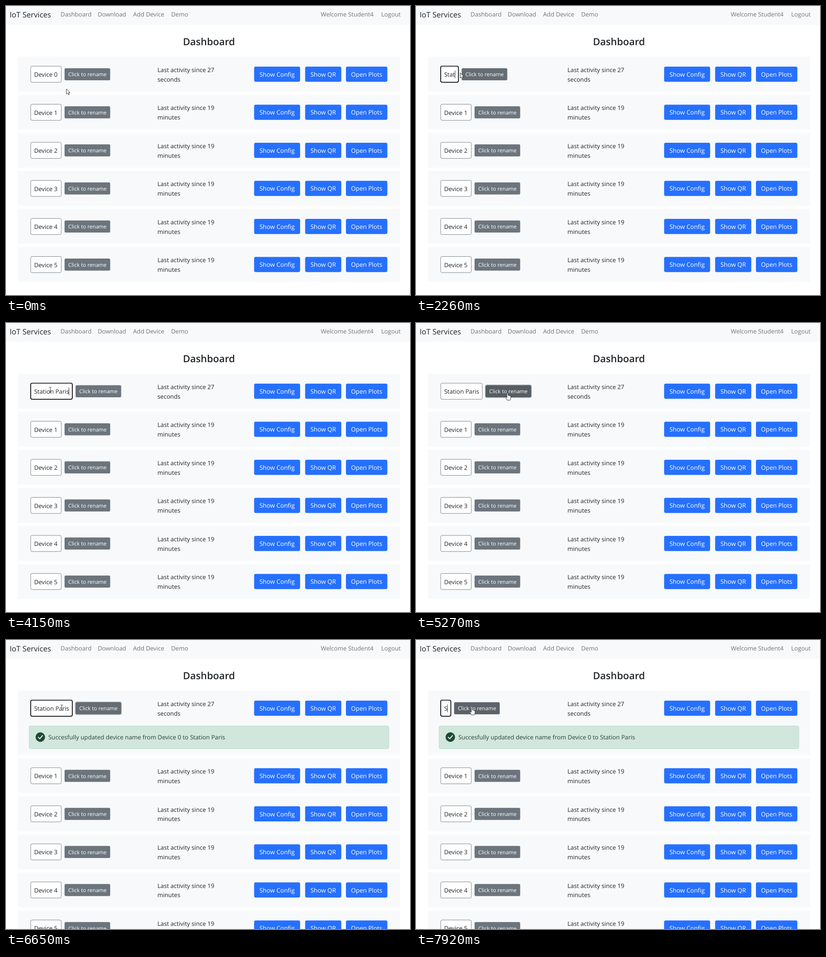
Animation of 883x634 px, one loop 8000 ms. Source, as an HTML page:

```html
<!DOCTYPE html>
<html lang="en">
<head>
<meta charset="utf-8">
<title>Dashboard</title>
<style>
  html, body { margin: 0; width: 100%; height: 100%; overflow: hidden; background: #fff; }
  svg { display: block; width: 883px; height: 634px; }
  text { font: 13.15px "Open Sans", "Noto Sans", sans-serif; fill: #212529; white-space: pre; text-rendering: geometricPrecision; }
  .brand { font-size: 16.5px; }
  .nav { fill: #717273; }
  .title { font-size: 21.5px; font-weight: 600; text-anchor: middle; }
  .button { font-size: 13.35px; fill: #fff; text-anchor: middle; }
  .small { font-size: 11.6px; fill: #fff; text-anchor: middle; }
  .notice { fill: #2c3e36; }
  .beam { mix-blend-mode: difference; fill: none; stroke: #ccc; }
</style>
</head>
<body>
<svg viewBox="0 0 883 634" xmlns="http://www.w3.org/2000/svg">
  <rect width="883" height="634" fill="#fff"/>
  <rect width="883" height="41.5" fill="#f8f9fa"/>
  <g id="header"></g>
  <g id="first"></g>
  <g id="others"></g>
  <g id="alert">
    <rect x="50.5" y="188.5" width="786.3" height="50" rx="3.5" fill="#d1e7dd" stroke="#badbcc"/>
    <circle cx="75" cy="213" r="10.4" fill="#1d4a36"/>
    <path d="M70.6 213.4l3.2 3.2l6-7" fill="none" stroke="#fff" stroke-width="1.9" stroke-linecap="round" stroke-linejoin="round"/>
    <text class="notice" x="92.4" y="218">Succesfully updated device name from Device 0 to Station Paris</text>
  </g>
  <g id="live"></g>
</svg>
<script>
const LOOP = 8000, ROW_TOP = 111.4, ROW_PITCH = 83.5, ALERT_SHIFT = 64.7;
const TEXT_X = 61.4, BOX_X = 54;
const GREY = '#6c757d', HOVER = '#5c636a', MIXED = '#656d74', PRESSED = '#565e64';

// Letter widths that size the rename field.
const ADVANCE = { S: 7.4, t: 4.7, a: 7.1, i: 3.4, o: 8.1, n: 7.9, ' ': 3.8, P: 7.8, r: 4.8, s: 5.9,
  D: 9.7, e: 7.3, v: 6.7, c: 6.4 };

// Each entry changes the state from its time on.
const STEPS = [
  [0, { value: 'Device 0', x: 132, y: 182, focus: false, caret: false, select: null, shade: null, ring: 0, alert: false }],
  [110, { x: 126, y: 176 }],
  [250, { x: 115, y: 166 }],
  [370, { x: 102, y: 152 }],
  [490, { x: 96.7, y: 146.7 }],
  [620, { focus: true, caret: true }],
  [740, { caret: false, select: [0, 6] }],
  [860, { select: [0, 8] }],
  [1630, { value: 'S', select: null, caret: true, shade: GREY }],
  [1750, { shade: MIXED }],
  [1880, { value: 'St', shade: null }],
  [2020, { value: 'Sta' }],
  [2260, { value: 'Stat', shade: MIXED }],
  [2390, { value: 'Stati', shade: null }],
  [2520, { value: 'Statio' }],
  [2770, { value: 'Station' }],
  [2890, { value: 'Station ' }],
  [3400, { value: 'Station P' }],
  [3520, { value: 'Station Pa' }],
  [3770, { value: 'Station Par' }],
  [3900, { value: 'Station Pari' }],
  [4150, { value: 'Station Paris' }],
  [4640, { x: 106, y: 148 }],
  [4770, { x: 137, y: 153 }],
  [4890, { x: 172, y: 156, shade: MIXED }],
  [5020, { x: 194, y: 156, shade: null }],
  [5150, { x: 200, y: 153.5 }],
  [5270, { focus: false, caret: false, shade: PRESSED, ring: 1.4 }],
  [5410, { ring: 2.8, alert: true }],
  [5520, { shade: HOVER }],
  [6030, { x: 194, y: 154 }],
  [6150, { x: 166, y: 153.5 }],
  [6280, { x: 132, y: 151.5 }],
  [6400, { x: 122, y: 150.5 }],
  [6650, { y: 148.5, focus: true, shade: MIXED, ring: 1.4 }],
  [6780, { caret: true, shade: null, ring: 0 }],
  [6900, { caret: false, select: [8, 13] }],
  [7020, { select: [0, 13] }],
  [7670, { value: 'S', select: null, caret: true, shade: GREY }],
  [7790, { shade: MIXED }],
  [7920, { shade: null }]
];

const byId = id => document.getElementById(id);
const widthOf = s => [...s].reduce((sum, c) => sum + (ADVANCE[c] || 7.5), 0);
const text = (x, y, s, cls = '') => `<text class="${cls}" x="${x}" y="${y}">${s}</text>`;
const rect = (x, y, w, h, fill, rx = 0, more = '') =>
  `<rect x="${x}" y="${y}" width="${w}" height="${h}" rx="${rx}" fill="${fill}" ${more}/>`;

function blueButton(x, w, label) {
  return rect(x, 133, w, 33.2, '#2670ff', 3.4) + text(x + w / 2, 154.9, label, 'button');
}

function renameButton(x, fill, ring = 0) {
  const halo = ring ? rect(x - ring, 136.5 - ring, 99.7 + 2 * ring, 26.5 + 2 * ring, '#b9bec2', 4.5) : '';
  return halo + rect(x, 136.5, 99.7, 26.5, fill, 2.8) + text(x + 50, 154.4, 'Click to rename', 'small');
}

function nameBox(w, focus) {
  const line = focus ? 'stroke="#000" stroke-width="1.7"' : `stroke="${GREY}" stroke-width="0.9"`;
  return rect(BOX_X, 132, w, 35.3, '#fff', 3.2, line);
}

// Background, activity and blue buttons of a row.
function rowBase(age, unit, height = 76.4) {
  return rect(26, ROW_TOP, 835.5, height, '#f8f9fa') +
    text(331, 144.9, 'Last activity since ' + age) + text(331, 165.7, unit) +
    blueButton(542.3, 100.5, 'Show Config') + blueButton(653.8, 79, 'Show QR') +
    blueButton(743, 90.5, 'Open Plots');
}

function fullRow(n) {
  return `<g transform="translate(0 ${n * ROW_PITCH})">` + rowBase(19, 'minutes') +
    nameBox(66.8, false) + text(TEXT_X, 155, 'Device ' + n) + renameButton(128, GREY) + '</g>';
}

function nameField(s, w) {
  let out = nameBox(w, s.focus);
  const [a, b] = s.select || [0, 0];
  const before = s.value.slice(0, a), chosen = s.value.slice(a, b);
  if (s.select) out += rect(TEXT_X + widthOf(before), 139.4, widthOf(chosen), 20.8, '#4390fb');
  out += text(TEXT_X, 155, `${before}<tspan fill="#fff">${chosen}</tspan>${s.value.slice(b)}`);
  if (s.caret) out += rect(TEXT_X + widthOf(s.value) - 0.5, 141.5, 1, 17, '#333');
  return out;
}

const POINTERS = {
  beam: '<path class="beam" d="M-2.6 -6H-.6L0 -5.4L.6 -6H2.6M0 -5.4V5.4M-2.6 6H-.6L0 5.4L.6 6H2.6"/>',
  arrow: '<path d="M0 0V11.4L2.7 9L4.5 13L6.3 12.2L4.6 8.2H8.1Z" fill="#fff" stroke="#222" stroke-width=".9"/>',
  hand: '<path d="M-1.2 1.2Q0 -.8 1.2 1.2V5.4Q2.6 4.3 3.4 6Q4.8 5.2 5.4 6.8Q7 6.4 7 8.2V11Q7 13 5.6 15.8H-.8' +
    'Q-2 13.4 -4.4 10Q-4.8 8.2 -3 8.6L-1.2 10.4Z" fill="#fff" stroke="#222" stroke-width=".9" stroke-linejoin="round"/>'
};

function pointerKind({ x, y }, boxRight) {
  if (y < 132 || y > 167 || x < BOX_X) return 'arrow';
  if (x < boxRight) return 'beam';
  return x >= boxRight + 7 && x < boxRight + 107 && y > 136 && y < 163 ? 'hand' : 'arrow';
}

function stateAt(t) {
  return Object.assign({}, ...STEPS.filter(([at]) => at <= t).map(([, change]) => change));
}

let shown = '';
function render(t) {
  const s = stateAt(t), key = JSON.stringify(s);
  if (key === shown) return;
  shown = key;
  const w = widthOf(s.value) + 14.8, boxRight = BOX_X + w;
  const kind = pointerKind(s, boxRight);
  const fill = s.shade || (kind === 'hand' ? HOVER : GREY);
  byId('first').innerHTML = rowBase(27, 'seconds', s.alert ? 141.1 : 76.4);
  byId('others').setAttribute('transform', `translate(0 ${s.alert ? ALERT_SHIFT : 0})`);
  byId('alert').style.display = s.alert ? '' : 'none';
  byId('live').innerHTML = renameButton(boxRight + 7.1, fill, s.ring) + nameField(s, w) +
    `<g transform="translate(${s.x} ${s.y})">${POINTERS[kind]}</g>`;
}

byId('header').innerHTML = text(8, 24.6, 'IoT Services', 'brand') +
  [[119.3, 'Dashboard'], [200.4, 'Download'], [277.8, 'Add Device'], [361, 'Demo'],
    [688, 'Welcome Student4'], [820, 'Logout']].map(([x, s]) => text(x, 23.1, s, 'nav')).join('') +
  text(443.6, 85.9, 'Dashboard', 'title');
byId('others').innerHTML = [1, 2, 3, 4, 5].map(fullRow).join('');

const start = performance.now();
function tick() {
  render((performance.now() - start) % LOOP);
  requestAnimationFrame(tick);
}
tick();
</script>
</body>
</html>
```
